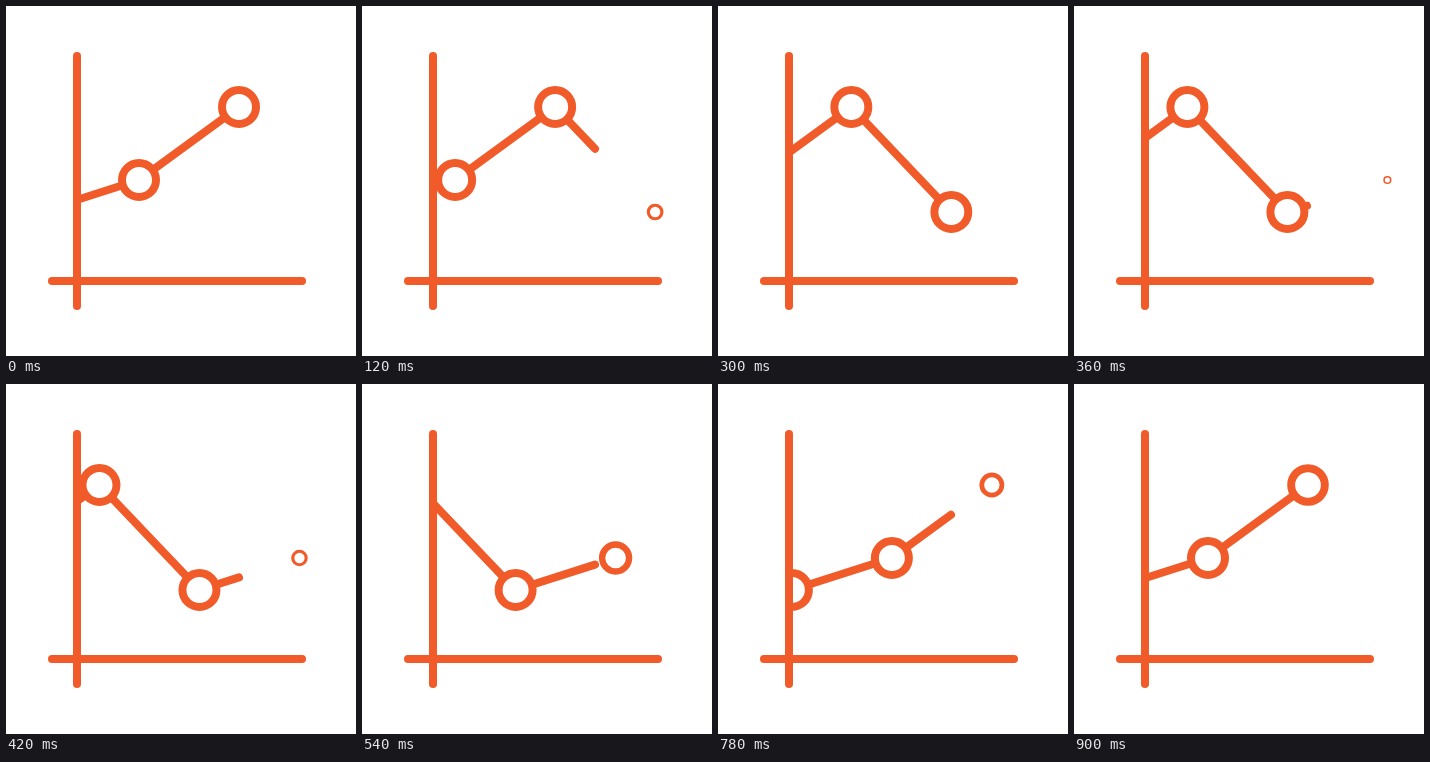
An HTML page with a canvas for the animation above (0.93 s loop, 350 by 350 pixels).

```html
<!DOCTYPE html>
<html lang="en">
<head>
<meta charset="utf-8">
<title>Scrolling line chart</title>
<style>
  html, body { margin: 0; width: 100%; height: 100%; overflow: hidden; background: #fff; }
  canvas { display: block; width: 350px; height: 350px; }
</style>
</head>
<body>
<canvas id="stage" width="350" height="350"></canvas>
<script>
const ctx = document.getElementById("stage").getContext("2d");
const COLOR = "#f15a29";
const LOOP = 930, STEP = 30;
const SPEED = 299 / 900;   // px per ms
const SPACING = 100;
const PEN_X = 233;         // where lines are drawn and rings reach full size
const HEIGHTS = [174, 101, 206];
const RADIUS = 17, WEIGHT = 8;
const CLIP_LEFT = 71, CLIP_RIGHT = 323;

function line(x1, y1, x2, y2) {
  ctx.beginPath();
  ctx.moveTo(x1, y1);
  ctx.lineTo(x2, y2);
  ctx.stroke();
}

function ring({ x, y }) {
  const scale = Math.min(1, 1 - (x - PEN_X) / SPACING);
  if (scale <= 0.01) return;
  ctx.lineWidth = WEIGHT * scale;
  ctx.beginPath();
  ctx.arc(x, y, RADIUS * scale, 0, Math.PI * 2);
  ctx.fill();
  ctx.stroke();
}

function segment(a, b) {
  if (a.x >= PEN_X) return;
  const part = Math.min(1, (PEN_X - a.x) / (b.x - a.x));
  line(a.x, a.y, a.x + (b.x - a.x) * part, a.y + (b.y - a.y) * part);
}

function draw(time) {
  const shift = time * SPEED;
  const points = Array.from({ length: 8 }, (_, i) => ({
    x: PEN_X + (i - 2) * SPACING - shift,
    y: HEIGHTS[(i + 2) % 3]
  }));

  ctx.fillStyle = "#fff";
  ctx.strokeStyle = COLOR;
  ctx.lineCap = "round";
  ctx.lineWidth = WEIGHT;
  ctx.fillRect(0, 0, 350, 350);

  ctx.save();
  ctx.beginPath();
  ctx.rect(CLIP_LEFT, 0, CLIP_RIGHT - CLIP_LEFT, 350);
  ctx.clip();
  points.slice(1).forEach((p, i) => segment(points[i], p));
  points.forEach(ring);
  ctx.restore();

  line(71, 50, 71, 300);
  line(46, 275, 296, 275);
}

const start = performance.now();

function tick() {
  const elapsed = (performance.now() - start) % LOOP;
  draw(Math.floor(elapsed / STEP) * STEP);
  requestAnimationFrame(tick);
}
tick();
</script>
</body>
</html>
```
